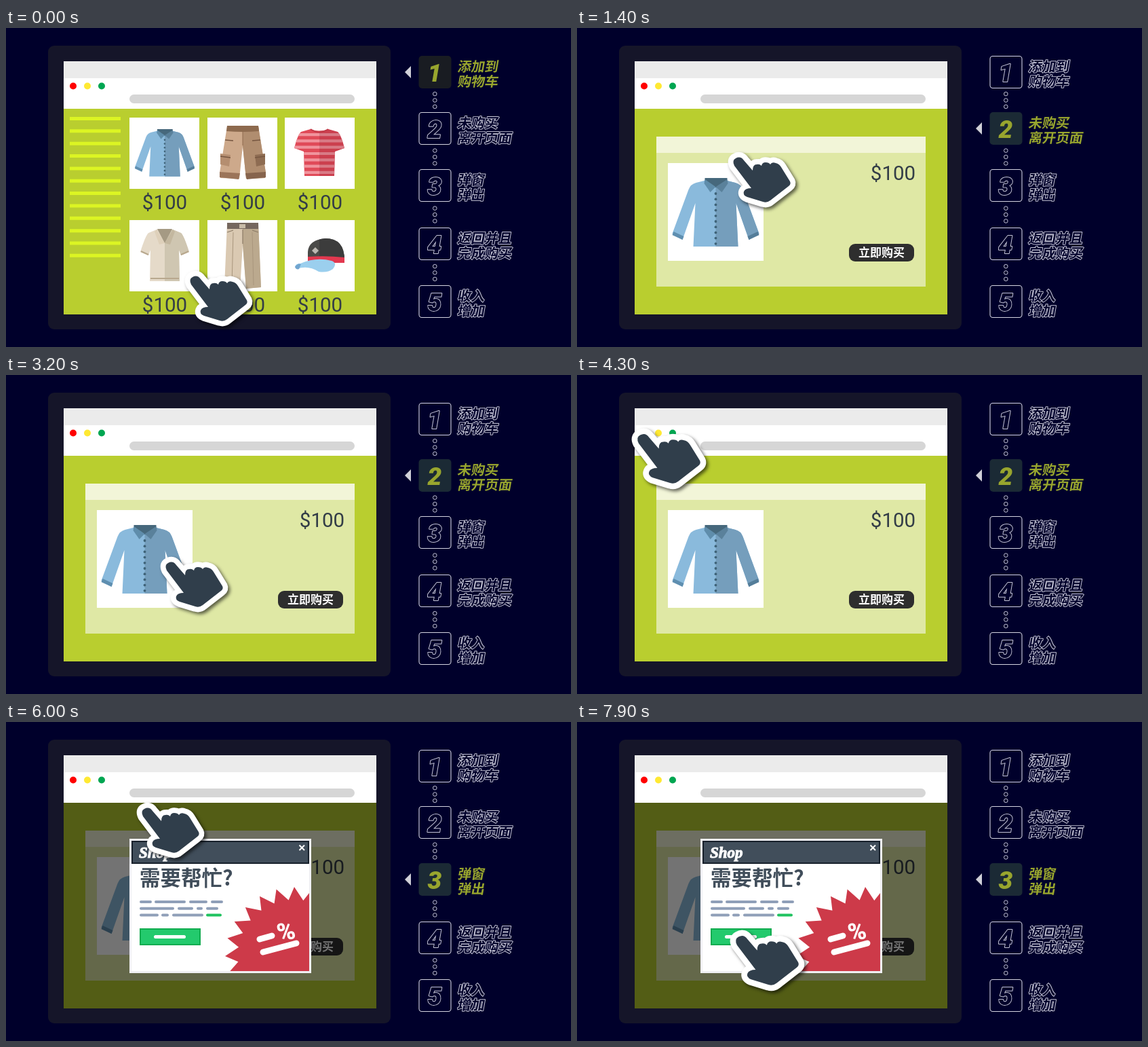
Animation of 833x470 px, one loop 8000 ms. Source, as an HTML page with a canvas:

```html
<!DOCTYPE html>
<html lang="zh-CN">
<head>
<meta charset="utf-8">
<title>Shop popup flow</title>
<style>
html, body { margin: 0; width: 100%; height: 100%; overflow: hidden; background: #00002b; }
canvas { display: block; }
</style>
</head>
<body>
<canvas id="stage" width="833" height="470"></canvas>
<script>
const c = document.getElementById('stage').getContext('2d');
const LOOP = 8000, TICK = 100;
const NAVY = '#00002b', OLIVE = '#b9ce2f', INK = '#333d47', LIME = '#98a52e';
const CJK = '"Noto Sans CJK SC", "Noto Sans CJK", sans-serif';

const clamp = v => Math.max(0, Math.min(1, v));
const ramp = (t, a, b) => clamp((t - a) / (b - a));

function box(x, y, w, h, color, r = 0) {
  c.fillStyle = color;
  c.beginPath();
  c.roundRect(x, y, w, h, r);
  c.fill();
}
function disc(x, y, r, color) {
  c.fillStyle = color;
  c.beginPath();
  c.arc(x, y, r, 0, 7);
  c.fill();
}
function shape(d, color) {
  c.fillStyle = color;
  c.fill(new Path2D(d));
}
function line(d, color, w) {
  c.strokeStyle = color;
  c.lineWidth = w;
  c.stroke(new Path2D(d));
}
function label(s, x, y, font, color, align = 'left') {
  c.font = font;
  c.textAlign = align;
  c.textBaseline = 'alphabetic';
  c.fillStyle = color;
  c.fillText(s, x, y);
}
function at(x, y, k, draw) {
  c.save();
  c.translate(x, y);
  c.scale(k, k);
  draw();
  c.restore();
}
// Paints d, then shades everything right of the middle line x = 0.
function halves(d, left, right) {
  const p = new Path2D(d);
  c.fillStyle = left;
  c.fill(p);
  c.save();
  c.clip(p);
  c.fillStyle = right;
  c.fillRect(0, -20, 200, 200);
  c.restore();
}

// Clothes: x = 0 is the middle, y = 0 the top.
function shirt() {
  halves('M-17 4L-29 7Q-37 9 -40 17L-64 82L-49 91L-30 37L-33 101H33L30 37L49 91L64 82L40 17Q37 9 29 7L17 4Z',
    '#8abadc', '#759ebc');
  shape('M-62 79L-47 86L-49 91L-64 84Z', '#5f8fb0');
  shape('M62 79L47 86L49 91L64 84Z', '#547d99');
  shape('M-16 0H17V8L0 14L-16 8Z', '#46687c');
  shape('M-16 2L0 13L-8 21L-17 8Z', '#5f8dab');
  shape('M17 2L0 13L9 21L18 8Z', '#5a819b');
  for (let y = 23; y < 100; y += 8.2) disc(0, y, 1.9, '#3f6378');
}
function shorts() {
  halves('M-23 1H23L34 69L33 77L5 78L0 30L-5 78L-33 77L-34 69Z', '#cda98b', '#b08d6f');
  shape('M-34 68L-4 70L-6 79L-34 76Z', '#9b7459');
  shape('M34 68L4 70L6 79L34 76Z', '#86644d');
  shape('M-33 41L-18 43L-20 60L-33 57Z', '#b58e70');
  shape('M33 41L18 43L20 60L33 57Z', '#8e6c52');
  line('M-33 45L-18 47M33 45L18 47M-26 21L-14 22M26 21L14 22', '#765640', 1.3);
  shape('M-23 0H23L24 8Q0 10 -24 8Z', '#8d6a4e');
  line('M0 8V29', '#8d6a4e', 1);
}
function tee() {
  const p = new Path2D('M-13 1L-27 5Q-32 9 -37 29L-23 34L-22 70H22L23 34L37 29Q32 9 27 5L13 1Q0 6 -13 1Z');
  c.save();
  c.clip(p);
  box(-40, 0, 80, 75, '#e04a58');
  for (let y = 7; y < 70; y += 9.3) box(-40, y, 80, 4.2, '#f0949d');
  box(0, 0, 40, 75, 'rgba(120,20,40,.2)');
  c.restore();
  line('M-13 1Q0 10 13 1', '#c33c4a', 2);
}
function polo() {
  halves('M-12 1L-24 6Q-28 9 -36 34L-24 39L-21 31L-22 77H22L21 31L24 39L36 34Q28 9 24 6L12 1Z',
    '#e5dac9', '#cfc6b1');
  line('M-35 33L-24 38M35 33L24 38M-21 73H21', '#b8a88e', 2);
  shape('M-11 0H11L0 21Z', '#a59a84');
  shape('M-12 1L0 21L-8 23L-15 4Z', '#ded0ba');
  shape('M12 1L0 21L8 23L15 4Z', '#c3b79f');
}
function trousers() {
  halves('M-23 1H23L27 95L5 97L0 32L-4 97L-27 95Z', '#dac9b2', '#bba98e');
  line('M-14 14L-16 92M14 14L16 92', '#a9967d', 1);
  line('M-23 14L-14 11M23 14L14 11M0 10V31', '#8b7a66', 1.2);
  shape('M-23 0H23V9H-23Z', '#75675e');
  box(-5, 2, 9, 6, '#c9bca8');
}
function cap() {
  halves('M-17 32V20Q-16 2 9 0Q37 0 37 32V35H-17Z', '#4a4a48', '#3c3c3c');
  shape('M-17 27Q10 25 37 28V36H-17Z', '#e2384f');
  shape('M-36 42Q-35 37 -28 37Q-5 27 18 33Q27 36 20 45Q12 51 -1 49Q-17 39 -33 45Z', '#9bcfee');
  shape('M-36 42Q-32 36 -27 38L-30 45Q-34 47 -36 42Z', '#72a5cf');
  shape('M-6 13L-1 18L-6 23L-11 18Z', '#bdb8b2');
}

function price(x, y) {
  label('$100', x, y, '400 29.5px Roboto, sans-serif', INK, 'center');
}

function catalog() {
  box(85, 119, 461, 303, OLIVE);
  for (let i = 0; i < 12; i++) box(94, 131 + i * 18.35, 75, 5, '#dcf523');
  for (const y of [132, 283])
    for (const x of [182, 297, 411]) {
      box(x, y, 103, 105, '#fff');
      price(x + 52, y + 135);
    }
  at(234, 149, .69, shirt);
  at(349, 144, 1, shorts);
  at(462, 148, 1, tee);
  at(234, 296, 1, polo);
  at(349, 287, 1, trousers);
  at(462, 310, 1, cap);
}

function product() {
  box(85, 119, 461, 303, OLIVE);
  box(117, 160, 397, 221, '#dfe8a5');
  box(117, 160, 397, 24, '#f2f5d8');
  box(134, 199, 141, 144, '#fff');
  at(204.5, 221, 1, shirt);
  price(466, 224);
  box(401, 318, 96, 26, '#2e2e2e', 9);
  label('立即购买', 449, 337, 'bold 17px ' + CJK, '#fff', 'center');
}

function burst() {
  c.save();
  c.beginPath();
  c.rect(185, 209, 262, 158);
  c.clip();
  c.fillStyle = '#cd3a49';
  c.beginPath();
  for (let i = 0; i < 48; i++) {
    const a = i * Math.PI / 24 + (i % 2 ? .03 : 0), r = i % 2 ? 83 : 102;
    c.lineTo(425 + r * Math.cos(a), 345 + r * Math.sin(a));
  }
  c.fill();
  c.lineCap = 'round';
  line('M374 320L392 315M379 339L428 326', '#fff', 9);
  c.translate(413, 309);
  c.rotate(-.2);
  label('%', 0, 12, '900 36px Roboto, sans-serif', '#fff', 'center');
  c.restore();
}

function popup() {
  box(182, 172, 268, 198, '#fff');
  box(185, 175, 262, 34, '#17202b');
  box(187, 177, 258, 30, '#414e5b');
  label('Shop', 196, 200, 'italic bold 23px "Liberation Serif", serif', '#fff');
  c.lineWidth = 1;
  c.strokeStyle = '#fff';
  c.strokeText('Shop', 196, 200);
  line('M432.5 181.5L440 189M440 181.5L432.5 189', '#fff', 2);
  label('需要帮忙?', 197, 241, 'bold 30.5px ' + CJK, '#414e5b');
  const rows = [
    [197, 215, 219, 265, 270, 297, 302, 320],
    [197, 248, 253, 276, 281, 290, 295, 313],
    [197, 225, 229, 240, 245, 291, 295, 318]
  ];
  rows.forEach((row, j) => {
    for (let i = 0; i < 8; i += 2)
      box(row[i], 263 + j * 9.8, row[i + 1] - row[i], 4, j == 2 && i == 6 ? '#1fc25f' : '#8f9fb8', 2);
  });
  box(197, 304, 90, 25, '#12ac50');
  box(199, 306, 86, 21, '#23ca6d');
  box(218, 314, 47, 5, '#fff', 2.5);
  burst();
  line('M183.5 173.5H448.5V368.5H183.5Z', '#f0f0f4', 3);
}

const steps = [
  [41, '添加到', '购物车'], [124, '未购买', '离开页面'], [208, '弹窗', '弹出'],
  [294, '返回并且', '完成购买'], [379, '收入', '增加']
];

function outlined(s, x, y, on) {
  if (!on) {
    c.lineJoin = 'round';
    c.lineWidth = 2;
    c.strokeStyle = '#c4c4d4';
    c.strokeText(s, x, y);
  }
  c.fillStyle = on ? LIME : NAVY;
  c.fillText(s, x, y);
}

function stepItem(i, on) {
  const [y, ...words] = steps[i];
  if (on) {
    box(580, y - 3, 170, 54, NAVY);
    box(608.5, y, 48, 48, i ? '#1b2a35' : '#191c22', 5);
    shape(`M588 ${y + 24}L597 ${y + 15}V${y + 33}Z`, '#d0d0d8');
  } else {
    c.strokeStyle = '#d4d4e0';
    c.lineWidth = 1.1;
    c.beginPath();
    c.roundRect(609, y + .5, 47, 47, 4);
    c.stroke();
  }
  c.textBaseline = 'alphabetic';
  c.textAlign = 'center';
  c.font = 'italic 900 37px Roboto, sans-serif';
  outlined(i + 1, 632, y + 37.5, on);
  c.textAlign = 'left';
  c.font = '900 20px ' + CJK;
  words.forEach((s, j) => {
    c.save();
    c.translate(665, y + 22.5 + j * 22);
    c.transform(1, 0, -.18, 1, 0, 0);
    outlined(s, 0, 0, on);
    c.restore();
  });
}

function sidebar(weights) {
  steps.forEach(([y], i) => {
    stepItem(i, false);
    if (i < 4) {
      const mid = (y + 48 + steps[i + 1][0]) / 2;
      for (let k = -1; k < 2; k++) {
        c.strokeStyle = '#c8c8d6';
        c.lineWidth = 1;
        c.beginPath();
        c.arc(632.3, mid + k * 9.4, 2.8, 0, 7);
        c.stroke();
      }
    }
  });
  weights.forEach((w, i) => faded(w, () => stepItem(i, true)));
}

function faded(a, draw) {
  if (a <= 0) return;
  c.save();
  c.globalAlpha = a;
  draw();
  c.restore();
}

// Pointer runs: [time, x, y]; it rests between them.
const runs = [
  [[0, 264, 358], [1000, 223, 183]],
  [[2300, 223, 183], [2750, 269, 232], [3050, 254, 271], [3200, 228, 268], [4100, 91, 87]],
  [[5400, 91, 87], [6000, 193, 119], [6300, 256, 115], [6700, 347, 124], [7000, 391, 190],
   [7200, 365, 264], [7700, 236, 315]]
];
const clicks = [1000, 4100, 7700], PRESS = 400;

function slope(run, i, k) {
  const a = run[Math.max(0, i - 1)], b = run[Math.min(run.length - 1, i + 1)];
  return (b[k] - a[k]) / (b[0] - a[0]);
}
function pointer(t) {
  const run = runs.filter(r => r[0][0] <= t).pop(), last = run[run.length - 1];
  if (t >= last[0]) return last.slice(1);
  const i = run.findIndex(p => p[0] > t) - 1, p = run[i], q = run[i + 1];
  const d = q[0] - p[0], u = (t - p[0]) / d, v = 1 - u;
  return [1, 2].map(k =>
    p[k] * v * v * (1 + 2 * u) + q[k] * u * u * (3 - 2 * u) +
    d * u * v * (slope(run, i, k) * v - slope(run, i + 1, k) * u));
}
// A click swells the hand and lets it shrink back.
function swell(t) {
  return clicks.reduce((s, a) => s + .1 * Math.sin(Math.PI * ramp(t, a, a + PRESS)), 1);
}

const HAND = new Path2D('M9 20Q5 12 11 9Q18 5 23 12L36 27Q36 18 42 18Q46 17 49 20Q50 15 55 15Q60 15 62 18' +
  'Q64 14 70 16Q75 17 78 22L91 43Q93 47 89 50L62 71Q57 75 51 73L28 66Q21 63 23 58Q25 53 34 53Z');

// Scales about the wrist, the lower right corner.
function hand([x, y], k) {
  at(x + 100, y + 83, k, () => {
    c.translate(-100, -83);
    c.lineJoin = 'round';
    c.lineWidth = 15.5;
    c.strokeStyle = '#fff';
    c.shadowColor = 'rgba(0,0,0,.6)';
    c.shadowBlur = 5;
    c.shadowOffsetX = c.shadowOffsetY = 3;
    c.stroke(HAND);
    c.shadowColor = 'transparent';
    c.fillStyle = '#303e4b';
    c.fill(HAND);
  });
}

function render(t) {
  const [page, pop] = clicks.map(a => ramp(t, a + PRESS / 2, a + PRESS)), third = t >= 5500;
  c.fillStyle = NAVY;
  c.fillRect(0, 0, 833, 470);
  box(62, 26, 505, 418, '#151529', 9);
  box(85, 49, 461, 25, '#ebebeb');
  box(85, 74, 461, 45, '#fff');
  disc(99, 85.5, 5, '#ff0000');
  disc(120, 85.5, 5, '#ffe933');
  disc(141, 85.5, 5, '#00a651');
  box(182, 98, 332, 13, '#d6d6d6', 6.5);

  c.save();
  c.beginPath();
  c.rect(85, 119, 461, 303);
  c.clip();
  if (page < 1) catalog();
  faded(page, product);
  faded(pop, () => {
    box(85, 119, 461, 303, 'rgba(0,0,0,.55)');
    popup();
  });
  c.restore();

  sidebar([1 - page, third ? 0 : page, third ? 1 : 0]);
  hand(pointer(t), swell(t));
}

function frame() {
  render(Math.floor(performance.now() % LOOP / TICK) * TICK);
  requestAnimationFrame(frame);
}
frame();
</script>
</body>
</html>
```
